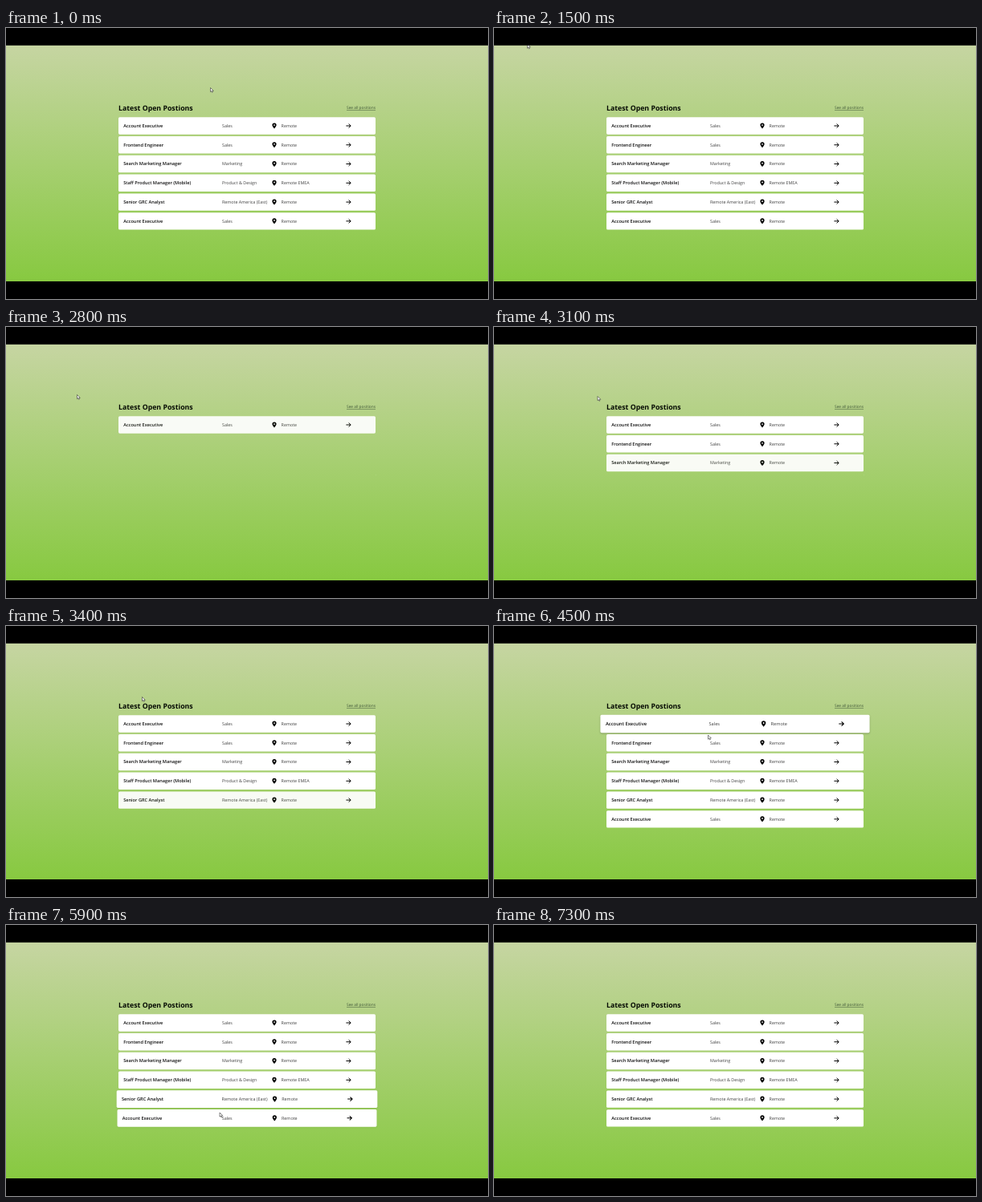
Write an HTML page that moves like this. It is 600 px wide and 338 px high and loops after 7400 ms.

```html
<!DOCTYPE html>
<html lang="en">
<head>
<meta charset="utf-8">
<title>Open positions</title>
<style>
  html, body { margin: 0; width: 100%; height: 100%; overflow: hidden; background: #000; }
  svg { display: block; width: 600px; height: 338px; }
  text { font-family: "Open Sans", "Noto Sans", sans-serif; text-rendering: geometricPrecision; }
  .title { font-size: 8.78px; font-weight: 700; fill: #050a02; }
  .link { font-size: 4.8px; fill: #3c5236; text-decoration: underline; }
  .role { font-size: 5.6px; font-weight: 600; fill: #101010; }
  .info { font-size: 5.36px; fill: #404040; }
</style>
</head>
<body>
<svg viewBox="0 0 600 338">
  <defs>
    <linearGradient id="sky" x1="0" y1="0" x2="0" y2="1">
      <stop offset="0" stop-color="#c6d5a2"/>
      <stop offset="1" stop-color="#87c940"/>
    </linearGradient>
    <g id="pin">
      <path d="M0 3.5C-1.5 1.7-2.6 .5-2.6-.9a2.6 2.6 0 0 1 5.2 0C2.6 .5 1.5 1.7 0 3.5Z"/>
      <circle cy="-.9" r=".9" fill="#fff"/>
    </g>
    <path id="arrow" d="M-3 0H2.7M.2-2.5 2.8 0 .2 2.5" fill="none" stroke="#000" stroke-width="1"/>
  </defs>
  <rect y="21" width="600" height="296" fill="url(#sky)"/>
  <text class="title" x="140" y="103.2">Latest Open Postions</text>
  <text class="link" x="460" y="101.3" text-anchor="end">See all positions</text>
  <g id="list"></g>
  <path id="cursor" d="M0 0V5.2L1.2 4.1 2 5.9 2.9 5.5 2.1 3.8H3.8Z" fill="#fff" stroke="#333" stroke-width=".6"/>
  <path d="M0 0H600V21.8H0ZM0 316.1H600V338H0Z"/>
</svg>
<script>
const LOOP = 7400, STEP = 100;
const TOP = 122, PITCH = 23.77, HALF = 10.7;
const RELOAD = 2660, STAGGER = 150, FADE = 150;
const HOVER = 150, GROW = 0.05, LAG = 20;
const CURSOR_GONE = 6400;

const jobs = [
  ["Account Executive", "Sales", "Remote"],
  ["Frontend Engineer", "Sales", "Remote"],
  ["Search Marketing Manager", "Marketing", "Remote"],
  ["Staff Product Manager (Mobile)", "Product & Design", "Remote EMEA"],
  ["Senior GRC Analyst", "Remote America (East)", "Remote"],
  ["Account Executive", "Sales", "Remote"]
];

// time, x, y of the pointer tip; it waits behind the top bar while the page reloads
const path = [
  [0, 254.5, 74.5], [700, 254.5, 74.5], [1500, 41.5, 20], [1600, 39, 10],
  [2100, 36, 12], [2300, 37, 42], [2800, 88.5, 84.5], [3400, 169.5, 88.5],
  [3900, 250, 112], [4400, 264, 128], [4500, 266.5, 136], [5900, 266, 234],
  [6030, 266, 248], [6290, 260, 80], [LOOP, 260, 80]
];

const clamp = v => Math.max(0, Math.min(1, v));

// cubic-bezier(.4, 0, .2, 1)
function ease(p) {
  if (p <= 0 || p >= 1) return clamp(p);
  let lo = 0, hi = 1, u;
  for (let k = 0; k < 18; k++) {
    u = (lo + hi) / 2;
    const x = 1.2 * u * (1 - u) ** 2 + 0.6 * u * u * (1 - u) + u ** 3;
    if (x < p) lo = u; else hi = u;
  }
  return 3 * u * u * (1 - u) + u ** 3;
}

function pointAt(t) {
  const k = Math.max(1, path.findIndex(p => p[0] >= t));
  const [t0, x0, y0] = path[k - 1], [t1, x1, y1] = path[k];
  const p = (t - t0) / (t1 - t0);
  return [x0 + (x1 - x0) * p, y0 + (y1 - y0) * p];
}

// Spans of time in which the pointer is over row i
function hoverSpans(i) {
  const spans = [];
  let inside = false;
  for (let t = 0; t < LOOP; t += 2) {
    const [x, y] = pointAt(t);
    const over = Math.abs(x - 300) < 160 && Math.abs(y - TOP - i * PITCH) < HALF;
    if (over && !inside) spans.push([t + LAG, LOOP]);
    if (!over && inside) spans[spans.length - 1][1] = t + LAG;
    inside = over;
  }
  return spans;
}

function lift([enter, leave], t) {
  const grown = ease((Math.min(t, leave) - enter) / HOVER);
  return grown * (1 - ease((t - leave) / HOVER));
}

const label = (cls, x, s) =>
  `<text class="${cls}" x="${x}" y="1.95">${s.replace("&", "&amp;")}</text>`;

const list = document.getElementById("list");
const cursor = document.getElementById("cursor");
list.innerHTML = jobs.map(([role, team, place]) => `<g>
  <rect x="-160" y="${-HALF}" width="320" height="${2 * HALF}" rx="1.6" fill="#fff"/>
  ${label("role", -153.8, role)}${label("info", -31, team)}${label("info", 42.6, place)}
  <use href="#pin" x="34"/><use href="#arrow" x="126.4"/></g>`).join("");
const rows = [...list.children];
const spans = jobs.map((_, i) => hoverSpans(i));

function draw(t) {
  rows.forEach((row, i) => {
    const h = Math.max(0, ...spans[i].map(s => lift(s, t)));
    row.setAttribute("transform", `translate(300 ${TOP + i * PITCH}) scale(${1 + GROW * h})`);
    row.style.filter = h > 0.001 ? `drop-shadow(0 1px 1.2px rgba(0,0,0,${0.25 * h}))` : "none";
    row.style.opacity = t < RELOAD ? 1 : clamp((t - RELOAD - i * STAGGER) / FADE);
  });
  const [x, y] = pointAt(t);
  cursor.setAttribute("transform", `translate(${x} ${y})`);
  cursor.style.display = t < CURSOR_GONE ? "" : "none";
}

const start = performance.now();
function tick() {
  const t = (performance.now() - start) % LOOP;
  draw(Math.floor(t / STEP) * STEP);
  requestAnimationFrame(tick);
}
tick();
</script>
</body>
</html>
```
